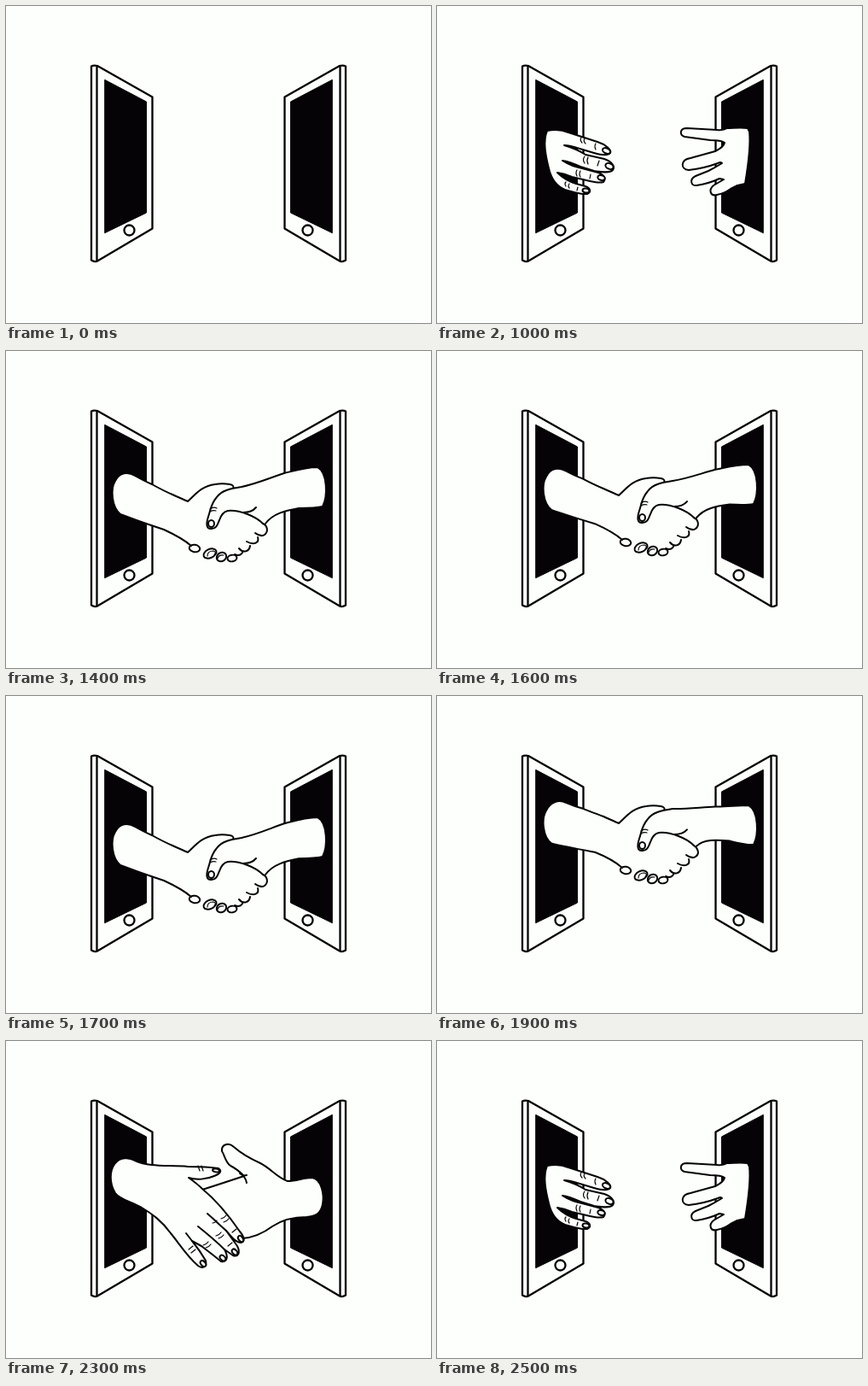
Write an HTML page that moves like this. It is 498 px wide and 371 px high and loops after 2.6 s.

```html
<!DOCTYPE html>
<html lang="en">
<head>
<meta charset="utf-8">
<title>Handshake between phones</title>
<style>
html, body { margin: 0; width: 100%; height: 100%; overflow: hidden; background: #fdfffc; }
svg { display: block; width: 498px; height: 371px; }
path, ellipse, circle { fill: #fdfffc; stroke: #050305; stroke-width: 2; stroke-linejoin: round; stroke-linecap: round; }
.line { fill: none; }
.fine { fill: none; stroke-width: 1.2; }
.bare { stroke: none; }
.phone path, .phone circle { stroke-width: 2.3; }
.phone .screen { fill: #050305; stroke-width: 1; }
.pose { visibility: hidden; }
.pose.on { visibility: visible; }
</style>
</head>
<body>
<svg viewBox="0 0 498 371">
  <defs>
    <clipPath id="cutL"><path d="M136,0V146C120,148 119,186 138,198V371H498V0Z"/></clipPath>
    <clipPath id="cutR"><path d="M360,0V154C374,156 374,196 360,202V371H0V0Z"/></clipPath>
    <g id="phone" class="phone">
      <path d="M100,70.500Q103,69 107,70L171.500,106.500V260.500L107,298.500Q104,300 100,297.500Z"/>
      <path class="line" d="M106.500,71V298"/>
      <path class="screen" d="M116,86.500L164.500,112V242L116,265.500Z"/>
      <circle cx="144.500" cy="262.500" r="6"/>
    </g>
  </defs>
  <use href="#phone"/>
  <use href="#phone" transform="matrix(-1 0 0 1 498 0)"/>
  <g id="stage"></g>
</svg>
<script>
const path = (d, cls = '') => `<path class="${cls}" d="${d}"/>`;
const line = d => path(d, 'line');
const fine = d => path(d, 'fine');
const oval = (x, y, rx, ry, turn = 0) =>
  `<ellipse rx="${rx}" ry="${ry}" transform="translate(${x} ${y}) rotate(${turn})"/>`;
const move = (art, x, y, clip) =>
  `<g${clip ? ` clip-path="url(#${clip})"` : ''}><g transform="translate(${x} ${y})">${art}</g></g>`;

// Fingers just leaving the screens
const emerging = [
  path('M129,146C139,144 147,145 154,148L188,159C198,162 205,169 203,172C200,176 191,174 184,172' +
    'L164,166Q155,163 149,163Q163,167 174,174L196,179C205,182 209,188 206,192C202,196 192,194 184,193' +
    'L168,188Q155,182 147,181Q158,188 170,190L189,195C197,198 198,203 195,206C189,208 180,205 171,203' +
    'L158,200Q149,196 141,195Q150,204 163,208L174,211C180,213 181,218 176,220C168,221 158,217 150,215' +
    'C140,211 134,203 131,190C127,174 124,158 129,146Z'),
  oval(198.500, 169.500, 4.800, 3, 25), oval(202, 187.500, 4.800, 3.200, 25),
  oval(192.500, 201, 4.300, 2.800, 15), oval(174.500, 216, 4, 2.500, 10),
  fine('M169,154Q167,157 170,160M173,155Q171,158 174,161M186,161Q184,164 186,168' +
    'M173,176Q170,180 173,184M177,177Q175,181 177,185M190,181L188,187' +
    'M164,192Q162,195 164,199M168,193Q166,197 168,200M180,197L179,202' +
    'M151,206Q149,208 151,211M155,208Q153,211 155,213M165,212L164,216'),
  path('M364,143C356,142 347,143 340,143Q335,146 328,145L293,143C284,143 284,151 290,153' +
    'L320,157Q333,157 337,160Q336,165 326,170L297,178C285,180 285,191 295,192' +
    'Q313,190 329,184Q333,182 334,184Q326,189 318,193L303,199C295,203 298,211 304,210' +
    'Q318,208 331,202L336,203L324,210C318,215 320,223 328,221Q337,219 344,214L352,210' +
    'L361,208C364,190 368,164 366,147Z')
].join('');

// Open hands about to meet
const openRight = path('M253,129C252,121 261,118 267,124C276,132 287,138 298,143C310,149 318,160 330,164' +
    'C341,164 348,160 359,160C370,162 373,180 371,191C369,202 363,205 352,206' +
    'C338,206 324,209 312,217C300,226 290,230 277,231L250,230C240,231 238,221 245,218' +
    'L232,214C223,211 224,203 231,202L226,198C216,194 219,183 226,181Q222,176 230,174Q252,167 279,158' +
    'Q271,150 263,146C257,142 256,133 253,129Z') +
  line('M274,155Q281,159 282,166M277,158L282,157');

const openLeft = path('M128,143C134,136 144,136 151,140C169,148 190,145 213,147C224,147 236,147 249,149' +
    'C254,152 250,156 244,158C235,162 223,163 214,160Q224,167 230,173C247,187 263,207 274,223' +
    'C280,230 280,236 275,236Q269,235 264,229L258,222L271,240C275,248 272,253 266,251L256,244' +
    'C261,253 259,259 252,258L242,250L229,240L218,234Q227,245 234,257C236,264 230,267 225,263' +
    'C212,252 203,237 193,225C182,210 172,203 159,195C146,188 133,185 128,178C121,166 121,152 128,143Z') +
  line('M236,202C244,209 250,215 258,222M225,217C235,225 246,234 256,244M211,225L218,234') +
  oval(246, 151.500, 4, 1.900, 8) + oval(275, 231.500, 2.500, 4, -35) + oval(268, 247, 2.600, 4, -40) +
  oval(254, 254, 2.600, 4, -45) + oval(231, 260.500, 2.600, 4, -40) +
  fine('M225,146L227,152M229,146L231,152M252,208Q256,207 258,204M255,212Q259,211 261,208' +
    'M242,213Q245,213 247,210M246,228Q250,227 252,224M249,231Q253,230 255,227M260,240L265,236' +
    'M231,239Q235,238 237,235M234,242Q238,241 240,238M214,244L219,240M217,248L222,244M265,224L270,220');

// Clasped hands: wrists and clasp rise by separate amounts and the arms bend between them
function clasp(leftY, gripY, rightY) {
  const ramp = (x, a, b) => Math.min(1, Math.max(0, (x - a) / (b - a)));
  const lift = (x, y) => leftY + (gripY - leftY) * ramp(x, 130, 190) +
    (rightY - gripY) * ramp(x + (190 - y) / 2, 295, 372);
  const bend = d => d.replace(/([\d.]+),([\d.]+)/g, (_, x, y) => `${x},${(+y + lift(+x, +y)).toFixed(1)}`);
  const tip = (x, y, ...size) => oval(x, y + lift(x, y), ...size);

  const leftArm = 'M217,228C209,221 198,215 185,209C170,204 149,197 134,191C124,183 122,162 128,152' +
    'C133,142 143,141 151,146C158,150 164,153 171,156C180,161 188,165 195,168C202,171 208,174 213,176' +
    'C222,168 229,158 245,156C251,155 256,155 262,156Q268,157 266,161';
  const rightArm = 'M304,202C313,190 327,187 343,184C353,184 363,184 371,182C377,170 377,143 365,136' +
    'C351,136 338,140 326,143C308,149 292,156 276,159C263,161 253,163 247,171' +
    'C240,179 240,185 237,194C234,203 235,209 241,208C247,208 248,202 250,198' +
    'C252,192 255,188 260,187';
  return [
    path(bend(leftArm + 'L280,165L301,202L306,209L303,215L295,218L292,227L283,229L279,236L270,239L232,237Z'), 'bare'),
    tip(265, 242.500, 5.500, 3.800, -10), tip(252.500, 241, 6, 5, -35),
    tip(239, 237, 8, 5, -25), tip(221, 231, 6.300, 4.200, 8),
    line(bend(leftArm)),
    line(bend('M301,202C306,204 308,211 303,215Q299,218 292,213M295,218C297,224 291,228 282,223' +
      'M286,228C285,235 278,237 273,231M277,236C275,239 272,240 268,238')),
    fine(bend('M236,240Q236,234 243,234Q247,235 244,239M248,243Q249,238 255,239')),
    path(bend(rightArm + 'L283,190Z'), 'bare'),
    line(bend(rightArm + 'C268,186 275,188 283,191C291,194 297,198 301,202M278,189Q288,189 293,183')),
    tip(240.500, 202, 3.500, 4),
    fine(bend('M239,185Q243,182 247,184M239,188Q243,186 246,187'))
  ].join('');
}

const poses = {
  none: '',
  emerging,
  reach: move(openRight, 28, -6, 'cutR') + move(openLeft, -28, 0, 'cutL'),
  open: openRight + openLeft,
  close: move(openRight, -4, -2) + move(openLeft, 4, 0),
  middle: clasp(0, 0, 0),
  top: clasp(-25, -39, -14),
  upper: clasp(-5, -7, -3),
  low: clasp(7, 7, 6),
  high: clasp(-18, -27, -8)
};
const timeline = [
  [0, 'none'], [1000, 'emerging'], [1100, 'reach'], [1200, 'open'], [1300, 'close'],
  [1400, 'middle'], [1500, 'top'], [1600, 'upper'], [1700, 'low'], [1900, 'high'],
  [2100, 'low'], [2300, 'open'], [2400, 'reach'], [2500, 'emerging']
];
const LOOP = 2600;

const stage = document.getElementById('stage');
stage.innerHTML = Object.entries(poses).map(([name, art]) => `<g class="pose" id="${name}">${art}</g>`).join('');
const start = performance.now();

function draw() {
  const t = (performance.now() - start) % LOOP;
  const name = timeline.filter(([from]) => from <= t).pop()[1];
  for (const pose of stage.children) pose.classList.toggle('on', pose.id === name);
  requestAnimationFrame(draw);
}
draw();
</script>
</body>
</html>
```
